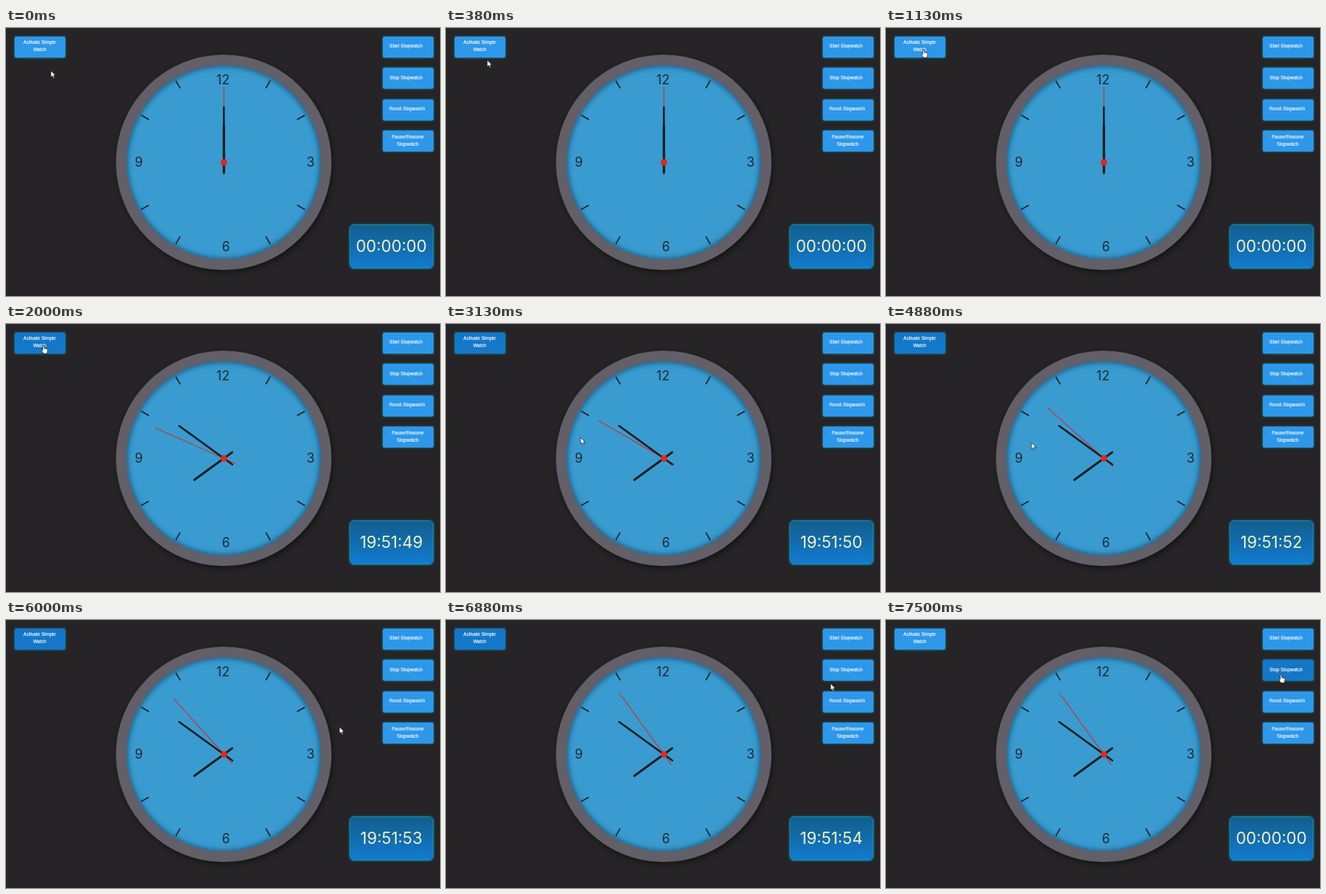
Write an HTML page that moves like this. It is 600x371 px and loops after 8 s.

```html
<!DOCTYPE html>
<html lang="en">
<head>
<meta charset="utf-8">
<title>Clock and stopwatch</title>
<style>
  html, body { margin: 0; width: 100%; height: 100%; overflow: hidden; background: #262426; }
  div, svg { position: absolute; box-sizing: border-box; }
  svg { left: 0; top: 0; }
  .ring {
    left: 152px; top: 37px; width: 298px; height: 298px; border-radius: 50%;
    background: #625f69; box-shadow: 2px 3px 7px #151415;
  }
  .face {
    left: 15px; top: 15px; width: 268px; height: 268px; border-radius: 50%;
    background: #3a9bd0; box-shadow: inset 0 0 7px 1px #14597f, 0 0 3px #386a8a;
  }
  .button { width: 70px; height: 29px; border-radius: 2px; box-shadow: 0 0 3px #10a5c4; }
  .display {
    left: 475px; top: 272px; width: 116px; height: 61px; border-radius: 6px;
    background: linear-gradient(#125e8c, #127bd0);
    border: 1px solid #128fae; box-shadow: 0 0 3px #129bb8;
  }
  .label { font: 6.5px "Liberation Sans", Arial, sans-serif; fill: #fff; stroke: #fff; stroke-width: .15; }
  .number { font: 18px Inter, sans-serif; fill: #1f2a33; }
  #digits { font: 22.5px Inter, sans-serif; fill: #f6f2bd; }
  text { text-anchor: middle; }
  line { stroke: #1d1d20; stroke-linecap: round; }
</style>
</head>
<body>
<div class="ring"><div class="face"></div></div>
<div class="display"></div>
<svg id="stage" width="600" height="371" viewBox="0 0 600 371">
  <g id="ticks"></g>
  <g class="number">
    <text x="300" y="78">12</text><text x="421" y="192.3">3</text>
    <text x="304" y="309.3">6</text><text x="183.5" y="192.3">9</text>
  </g>
  <g transform="translate(301.2 186)">
    <line id="second" y1="17" y2="-104" style="stroke:#cf2c28;stroke-width:1.1"/>
    <line id="minute" y1="14.5" y2="-76.5" stroke-width="2.6"/>
    <line id="hour" y1="14" y2="-50.5" stroke-width="3.1"/>
    <circle r="4.5" fill="#d92b20"/>
  </g>
  <text id="digits" x="532.7" y="310.3"></text>
  <g id="labels" class="label"></g>
  <g id="cursor" fill="#fff" stroke="#111" stroke-width=".7" stroke-linejoin="round">
    <path id="arrow" d="M0 0V9.2L2.1 7.3 3.6 10.6 5.2 9.9 3.7 6.7H6.6Z"/>
    <path id="hand" d="M-1 0Q0-1.2 1 0V3.6L5 4.7Q6 5 5.7 6.5L4.6 11H-.1L-3 6.6Q-3.2 5.2-1 6.3Z"/>
  </g>
</svg>
<script>
const LOOP = 8000, START = 1750, STOP = 7080, FADE = 230;
const $ = id => document.getElementById(id);
const clamp = v => Math.max(0, Math.min(1, v));
const mix = (a, b, k) => a + (b - a) * k;
const smooth = k => k * k * (3 - 2 * k);

// x, y, label centre, label lines
const buttons = [
  [11.5, 11.5, 46.5, ["Activate Simple", "Watch"]],
  [520.5, 11.5, 553, ["Start Stopwatch"]],
  [520.5, 55, 553, ["Stop Stopwatch"]],
  [520.5, 98.5, 554.5, ["Reset Stopwatch"]],
  [520.5, 142, 555.5, ["Pause/Resume", "Stopwatch"]]
].map(([x, y, cx, lines]) => {
  const el = document.createElement("div");
  el.className = "button";
  el.style.left = x + "px";
  el.style.top = y + "px";
  document.body.insertBefore(el, $("stage"));
  lines.forEach((text, i) => {
    const baseline = y + (lines.length > 1 ? 10.7 + i * 10 : 15.7);
    $("labels").innerHTML += `<text x="${cx}" y="${baseline}">${text}</text>`;
  });
  return { el, x, y };
});

for (let h = 1; h < 12; h++)
  if (h % 3) $("ticks").innerHTML +=
    `<line y1="-119" y2="-130" stroke-width="1.7" transform="translate(300 186) rotate(${h * 30})"/>`;

// time, x, y
const path = [
  [130, 62, 59], [630, 52, 30], [2300, 52, 30], [3130, 186, 157], [3250, 186, 157],
  [4000, 201, 164], [4900, 201, 164], [5950, 461, 148], [6400, 461, 148], [7050, 546, 76]
];

function cursorAt(t) {
  const i = path.findIndex(p => p[0] > t);
  if (i === 0) return path[0].slice(1);
  if (i < 0) return path[path.length - 1].slice(1);
  const [a, b] = [path[i - 1], path[i]];
  const k = smooth((t - a[0]) / (b[0] - a[0]));
  return [mix(a[1], b[1], k), mix(a[2], b[2], k)];
}

function shade(button, k) {
  const light = [45, 151, 234], dark = [20, 119, 200];
  button.el.style.background = `rgb(${light.map((c, i) => mix(c, dark[i], k))})`;
}

const turn = (id, angle) => $(id).setAttribute("transform", `rotate(${angle})`);

function draw(t) {
  const started = t >= START;
  const sec = 49 + Math.floor((Math.min(t, STOP) - START) / 1000);
  turn("second", started ? sec * 6 : 0);
  turn("minute", started ? 51 * 6 : 0);
  turn("hour", started ? 234 : 0);
  $("digits").textContent = started && t < STOP ? "19:51:" + sec : "00:00:00";

  const on = clamp((t - START) / FADE), off = clamp((t - STOP) / FADE);
  buttons.forEach((b, i) => shade(b, i === 0 ? on - off : i === 2 ? off : 0));

  const [x, y] = cursorAt(t);
  const over = buttons.some(b => x > b.x && x < b.x + 70 && y > b.y && y < b.y + 29);
  $("cursor").setAttribute("transform", `translate(${x} ${y})`);
  $("arrow").style.display = over ? "none" : "";
  $("hand").style.display = over ? "" : "none";
}

const begin = performance.now();
function frame() {
  draw((performance.now() - begin) % LOOP);
  requestAnimationFrame(frame);
}
frame();
</script>
</body>
</html>
```
